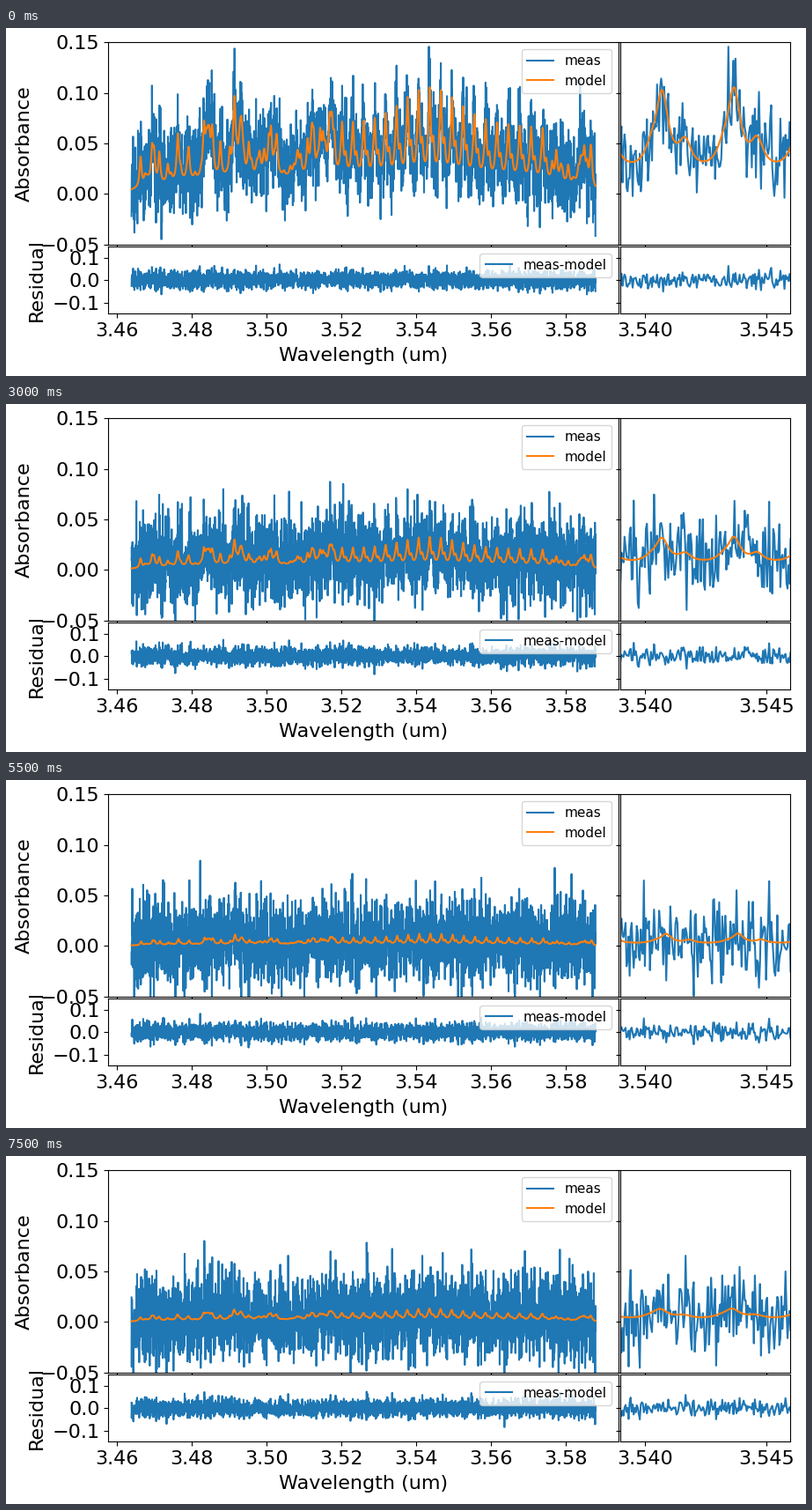
A matplotlib script for the animation above (9.5 s loop, 909 by 395 pixels).

```python
import numpy as np
import matplotlib.pyplot as plt
from matplotlib.animation import FuncAnimation

W, H, DPI = 909, 395, 100
STEPS, FRAMES, INTERVAL = 16, 19, 500

wave = 1 / np.linspace(1 / 3.4639, 1 / 3.5880, 2990)


def line_list():
    """Centres (um) and heights: a regular branch between two random ones."""
    rng = np.random.default_rng(4)
    j = np.arange(-8, 11)
    centre = 3.54368 + 0.00297 * j + 5e-6 * j ** 2
    peak = 0.047 + 0.031 * np.exp(-j ** 2 / 12)
    pos = [centre, centre + 0.00095, centre - 0.00045]
    height = [peak, 0.36 * peak, 0.18 * peak]
    for lo, hi, n in ((3.464, 3.519, 90), (3.576, 3.588, 20)):
        pos.append(rng.uniform(lo, hi, n))
        height.append(np.minimum(rng.exponential(0.012, n), 0.03))
    strong = np.array([3.4694, 3.4833, 3.4854, 3.4933, 3.5012, 3.5110, 3.5169])
    pos.append(strong)
    height.append(np.full(strong.size, 0.032))
    return np.concatenate(pos), np.concatenate(height)


POS, HEIGHT = line_list()


def model_at(k):
    """Fading absorbance; the fit drifts a little once the signal is weak."""
    amp = np.interp(k, [0, 2, 4, 6, 9, 15], [1, 0.786, 0.527, 0.31, 0.12, 0.12])
    width = 0.00032 * np.interp(k, [9, 12, 15], [1, 0.75, 1.2])
    shift = np.interp(k, [6, 12, 15], [0, 2e-4, -8e-5])
    u = (wave[:, None] - shift - POS) / width
    lines = (HEIGHT / (1 + u ** 2)).sum(axis=1)
    base = 0.016 * (1 - ((wave - 3.526) / 0.066) ** 4)
    return amp * (lines + base)


def spectrum(k):
    """Measured and modelled absorbance at one step."""
    rng = np.random.default_rng(100 + k)
    model = model_at(k)
    sigma = 0.020 + 0.003 * ((wave - 3.526) / 0.062) ** 2
    return model + sigma * rng.standard_normal(wave.size), model


data = [spectrum(k) for k in range(STEPS)]

plt.rcParams.update({"font.family": "DejaVu Sans", "font.size": 16,
                     "legend.fontsize": 11, "axes.labelpad": 5.5})
fig, axes = plt.subplots(
    2, 2, figsize=(W / DPI, H / DPI), dpi=DPI, sharex="col", sharey="row",
    gridspec_kw=dict(width_ratios=[3, 1], height_ratios=[3, 1],
                     wspace=0.005, hspace=0.015,
                     left=116.3 / W, right=891.3 / W,
                     bottom=70.7 / H, top=378.7 / H))
(main, zoom), (res, res_zoom) = axes


def add_lines(row, color, label):
    return [ax.plot([], [], color, label=label)[0] for ax in row]


meas_lines = add_lines((main, zoom), "C0", "meas")
model_lines = add_lines((main, zoom), "C1", "model")
res_lines = add_lines((res, res_zoom), "C0", "meas-model")

margin = 0.05 * (wave[-1] - wave[0])
main.set_xlim(wave[0] - margin, wave[-1] + margin)
zoom.set_xlim(3.539, 3.546)
main.set_ylim(-0.05, 0.15)
res.set_ylim(-0.15, 0.15)
res.set_xticks(3.46 + 0.02 * np.arange(7))
res_zoom.set_xticks([3.540, 3.545])
main.set_yticks([-0.05, 0, 0.05, 0.10, 0.15])
res.set_yticks([-0.1, 0, 0.1])
res.xaxis.set_major_formatter("{x:.2f}")
res_zoom.xaxis.set_major_formatter("{x:.3f}")
main.set_ylabel("Absorbance")
res.set_ylabel("Residual")
res.set_xlabel("Wavelength (um)")
for ax in (main, res):
    ax.legend(loc="upper right")


def update(i):
    meas, model = data[min(i, STEPS - 1)]
    for group, y in ((meas_lines, meas), (model_lines, model),
                     (res_lines, meas - model)):
        for line in group:
            line.set_data(wave, y)
    return meas_lines + model_lines + res_lines


anim = FuncAnimation(fig, update, frames=FRAMES, interval=INTERVAL,
                     init_func=lambda: update(0), repeat=True, repeat_delay=0)
plt.show()
```
